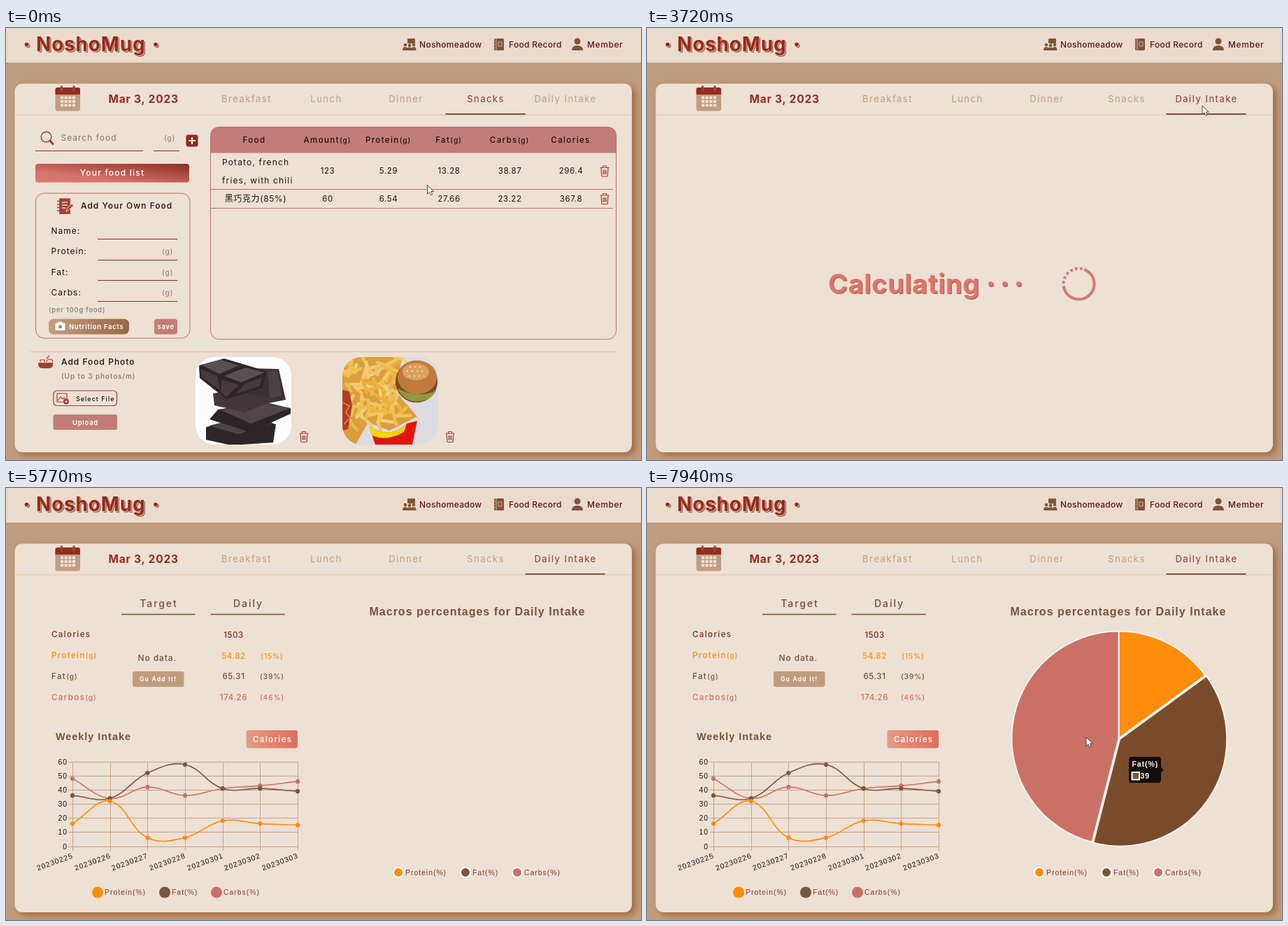
Animation of 908 by 617 pixels, one loop 8 s. Source, as an HTML page:

```html
<!DOCTYPE html>
<html lang="en">
<head>
<meta charset="utf-8">
<title>Food record</title>
<style>
  html, body { margin: 0; width: 100%; height: 100%; overflow: hidden; background: #c09c7f; }
  svg { display: block; width: 100%; height: 100%; }
  text { font: 12px Inter, "Noto Sans CJK TC", "Noto Sans CJK SC", sans-serif; letter-spacing: 1px; fill: #1a1212; }
  .mid { text-anchor: middle; }
  .end { text-anchor: end; }
  .med { font-weight: 500; }
  .nav { font-weight: 500; letter-spacing: .3px; fill: #5c1410; }
  .tab { font-size: 13px; letter-spacing: 1.5px; text-anchor: middle; }
  .head { font-size: 11.5px; font-weight: 500; letter-spacing: 1.4px; }
  .num { font-size: 11.5px; letter-spacing: .6px; text-anchor: middle; }
  .unit, .head tspan { font-size: 10px; letter-spacing: 1px; }
  .gray { fill: #85766c; }
  .btn { font-size: 9.4px; font-weight: 600; letter-spacing: .8px; fill: #fff; }
  .col { font-size: 14px; font-weight: 500; letter-spacing: 1.9px; fill: #7a4f36; text-anchor: middle; }
  .chart { font: 10.4px "Liberation Sans", Arial, sans-serif; }
  .title { font: bold 16px "Liberation Sans", Arial, sans-serif; fill: #7a5238; }
  .tip { font: bold 10.4px "Liberation Sans", Arial, sans-serif; fill: #fff; }
  .key { fill: #853a2e; }
  .line { stroke: #8f2a20; fill: none; }
  .rose { stroke: #bb6e68; fill: none; }
  .icon { stroke: #a63f35; fill: none; stroke-width: 1.2; }
</style>
</head>
<body>
<svg viewBox="0 0 908 617" xmlns="http://www.w3.org/2000/svg">
  <defs>
    <linearGradient id="list" y1="1" y2="0"><stop stop-color="#d97a6f"/><stop offset=".3" stop-color="#d2746a"/><stop offset="1" stop-color="#8f2b22"/></linearGradient>
    <linearGradient id="facts"><stop stop-color="#c39f82"/><stop offset="1" stop-color="#9c6644"/></linearGradient>
    <linearGradient id="kcal"><stop stop-color="#e29c8a"/><stop offset=".5" stop-color="#e5826c"/><stop offset="1" stop-color="#dd6e62"/></linearGradient>
    <clipPath id="choc"><rect x="271" y="470" width="137" height="125" rx="27"/></clipPath>
    <clipPath id="fry"><rect x="481" y="470" width="136.500" height="125" rx="27"/></clipPath>
    <clipPath id="area"><rect x="91" y="388" width="330" height="127"/></clipPath>
    <g id="bin" class="icon"><path d="M0 3h13M4 3V.5h5V3M1.500 3l.8 11.500q.1 1 1 1h6.400q.9 0 1-1L11.500 3M4.500 6v6.500M6.500 6v6.500M8.500 6v6.500"/></g>
  </defs>

  <rect width="908" height="617" fill="#c09c7f"/>
  <rect width="908" height="49.500" fill="#ebdbcd" style="filter:drop-shadow(0 0 1px #a57e60)"/>
  <rect x="12.500" y="79.500" width="882.500" height="526.500" rx="11" fill="#ede0d4" style="filter:drop-shadow(5px 4px 5px #a0693f)"/>
  <path d="M12.500 124H895" stroke="#e2c5b0"/>

  <!-- header -->
  <g style="filter:drop-shadow(1px 1px 0 #dcb892) drop-shadow(1.500px 1.500px 0 #8a6148)">
    <text x="43" y="33" style="font-size:28px;font-weight:700;letter-spacing:.8px;fill:#952b20">NoshoMug</text>
    <circle cx="29.500" cy="23.500" r="2.800" fill="#952b20"/><circle cx="214" cy="23.500" r="2.800" fill="#952b20"/>
  </g>
  <g fill="#7f5539">
    <path d="M575 15h9q1 0 1 1v5q0 1-1 1h-5l-2 2v-2h-2q-1 0-1-1v-5q0-1 1-1z"/>
    <circle cx="571" cy="24" r="2.300"/><circle cx="577" cy="25" r="2.300"/><circle cx="583" cy="24" r="2.300"/>
    <path d="M567 32q0-5 4-5 2 0 3 1.500 3-2 6 0 1-1.500 3-1.500 3.500 0 3.500 5z"/>
    <rect x="698" y="15" width="14" height="17" rx="1.500"/>
    <circle cx="817" cy="19" r="4.500"/><path d="M809 32q0-7 8-7t8 7z"/>
  </g>
  <path d="M701 15v17M696.500 19h3M696.500 23.500h3M696.500 28h3M704 20h5v6h-5z" stroke="#cdb29c" fill="none"/>
  <text x="591" y="27.500" class="nav">Noshomeadow</text>
  <text x="719" y="27.500" class="nav">Food Record</text>
  <text x="831" y="27.500" class="nav" style="letter-spacing:.6px">Member</text>

  <!-- calendar and tabs -->
  <rect x="70.500" y="85" width="35.500" height="33.500" rx="3" fill="#c09c7f"/>
  <path d="M70.500 95v-7q0-3 3-3h29.500q3 0 3 3v7z" fill="#952b20"/>
  <path d="M79.500 84v5M97 84v5" stroke="#7f5539" stroke-width="3.500" stroke-linecap="round"/>
  <path d="M78 99.500h21M78 105h21M78 110.500h21" stroke="#ede0d4" stroke-width="4" stroke-dasharray="4.200 1.400"/>
  <text x="146.500" y="107" style="font-size:15.500px;font-weight:700;letter-spacing:.8px;fill:#952b20">Mar 3, 2023</text>
  <g id="tabs"></g>
  <path id="mark" d="M0 122.800h114" stroke="#6f3b2c" stroke-width="1.700"/>

  <!-- snack list -->
  <g id="snacks">
    <circle cx="57.500" cy="155.500" r="7.300" fill="none" stroke="#7a4a3a" stroke-width="1.400"/>
    <path d="M63 161l4 4.500" stroke="#a5382c" stroke-width="3" stroke-linecap="round"/>
    <text x="78.500" y="161" class="gray">Search food</text>
    <text x="226" y="161" class="gray unit">(g)</text>
    <path class="line" d="M42 175.500H196M211 175.500H248M131 301.500H245M131 331.500H245M131 360.500H245M131 390.500H245"/>
    <rect x="257.500" y="152.500" width="17" height="17" rx="3" fill="#952b20"/>
    <path d="M261 161h10M266 156v10" stroke="#fff" stroke-width="2"/>
    <rect x="42" y="194" width="220" height="26.500" rx="4" fill="url(#list)"/>
    <text x="152" y="211" class="mid med" style="fill:#fff;letter-spacing:1.200px">Your food list</text>

    <rect x="42.500" y="236" width="220.500" height="207" rx="12" class="rose"/>
    <path d="M77 244h14v21H77zM73 247.500h5M73 252h5M73 256.500h5M73 261h5" fill="#a63f35" stroke="#a63f35" stroke-width="1.600"/>
    <path d="M80 249h8M80 253h8M80 257h5" stroke="#ede0d4" stroke-width="1.300"/>
    <path d="M86 262l1-4 7-7 2.500 2.500-7 7z" fill="#a63f35" stroke="#ede0d4"/>
    <text x="107" y="258" class="med">Add Your Own Food</text>
    <g id="form"></g>
    <text x="61" y="406" class="gray med" style="font-size:9.200px;letter-spacing:.9px">(per 100g food)</text>
    <rect x="61" y="415.500" width="115" height="22" rx="7" fill="url(#facts)"/>
    <path d="M71 422h3l1.500-2h4l1.500 2h3v9.500H71z" fill="#fff" stroke="#fff" stroke-linejoin="round"/>
    <circle cx="77.500" cy="426.500" r="2.600" fill="#b38a6b"/>
    <text x="90" y="430" class="btn">Nutrition Facts</text>
    <rect x="212" y="415.500" width="33" height="22" rx="4" fill="#c27d78"/>
    <text x="216.500" y="430" class="btn">save</text>

    <path d="M292.500 178.500V154q0-12.500 12.500-12.500h555q12.500 0 12.500 12.500v24.500z" fill="#c27d78"/>
    <rect x="292.500" y="141.500" width="580" height="303" rx="12" class="rose"/>
    <path class="rose" d="M292 230.500H868M292 257.500H868"/>
    <text x="309" y="195.500" style="letter-spacing:1.150px">Potato, french</text>
    <text x="309" y="221.500" style="letter-spacing:1.150px">fries, with chili</text>
    <text x="357" y="248" class="mid" style="letter-spacing:.6px">黑巧克力(85%)</text>
    <g id="table"></g>
    <use href="#bin" x="849.500" y="196.500"/><use href="#bin" x="849.500" y="236"/>

    <path d="M35 462.500H873" stroke="#dcbba6"/>
    <path d="M46 478h21.500q0 8-6 8H52q-6 0-6-8z" fill="#a63f35"/>
    <path d="M49 477v-3h6v3M58 477q0-4 4.500-4t4 4M58 472l4-4" class="icon" stroke-width="2"/>
    <text x="79" y="481" class="med">Add Food Photo</text>
    <text x="79" y="501" class="gray med" style="font-size:10px;letter-spacing:.9px">(Up to 3 photos/m)</text>
    <rect x="68" y="518" width="90.500" height="21.500" rx="5" class="icon"/>
    <path class="icon" d="M73 522h14v12H73zM74 532l4-5 3 3 2-2 3 4"/>
    <circle cx="86" cy="533.500" r="4" fill="#a63f35"/><path d="M84 533.500h4M86 531.500v4" stroke="#ede0d4"/>
    <text x="100" y="532.500" class="med" style="font-size:9px">Select File</text>
    <rect x="67.500" y="552" width="91.500" height="22" rx="3" fill="#c27d78"/>
    <text x="113.500" y="566.500" class="btn mid">Upload</text>

    <g clip-path="url(#choc)">
      <rect x="271" y="470" width="137" height="125" fill="#fdfdfd"/>
      <path d="M286 570l60-16 40 12-4 26-60 4-36-8z" fill="#2c2628"/>
      <path d="M290 568l56-14 36 10-50 16z" fill="#4b4346"/>
      <path d="M303 545l60-10 44 8v8l-58 26-58-18z" fill="#2b2527"/>
      <path d="M306 545l60-12 40 10-56 22z" fill="#504649"/>
      <path d="M345 486l45 1 10 44-46 9-52-14z" fill="#393133"/>
      <path d="M374 490l14-1 7 36-18 4z" fill="#4a4144"/>
      <path d="M296 522l26-5 64 14-44 18-44-10z" fill="#413739"/>
      <path d="M276 482l36-10 60 18-5 24-52 16-38-30z" fill="#2d2729"/>
      <path d="M279 481l28-7 26 8-28 12zM312 497l30-12 28 7-34 14z" fill="#5a5053"/>
      <path d="M278 487l24 10 4 20-26-18zM309 502l24 8-18 17-8-8zM340 509l26-10-3 12-34 12z" fill="#453b3e"/>
    </g>
    <g clip-path="url(#fry)">
      <rect x="481" y="470" width="137" height="125" fill="#dcdce2"/>
      <path d="M481 470h85l-8 50 30 35-40 20-30-12-18 32h-19z" fill="#dc9e3c"/>
      <g id="fries" stroke-width="4.500" stroke-linecap="round"></g>
      <path d="M481 517l10 2 4 20-6 34-8 2z" fill="#b23c20"/>
      <path d="M482 535l9 5-5 9 6 8-9 9" stroke="#e07a4a" stroke-width="2" fill="none"/>
      <circle cx="587" cy="505" r="30" fill="#7b4a22"/>
      <path d="M560 515q10 20 30 18 18-1 25-15-26 12-55-3z" fill="#8f9a3a"/>
      <ellipse cx="588" cy="499" rx="28" ry="24" fill="#c27a3c"/>
      <ellipse cx="586" cy="491" rx="19" ry="12" fill="#dba15f"/>
      <path d="M573 490h27M577 484h20M576 497h22" stroke="#f6dfb0" stroke-width="2" stroke-dasharray="2 5"/>
      <path d="M519 569q30 19 54-4l15-4-7 34h-53z" fill="#e0170f"/>
      <path d="M519 569q30 19 54-4l-4 12q-24 14-46 5z" fill="#f8d400"/>
    </g>
    <use href="#bin" x="419.500" y="576"/><use href="#bin" x="628.500" y="576"/>
  </g>

  <!-- loading -->
  <g id="loading">
    <g fill="#dc766b" style="filter:drop-shadow(1.500px 1.500px 0 #a9574d)">
      <text x="259" y="379" style="font-size:38px;font-weight:700;letter-spacing:.55px;fill:#dc766b">Calculating</text>
      <circle cx="491.500" cy="365.500" r="3.500"/><circle cx="511.500" cy="365.500" r="3.500"/><circle cx="531.500" cy="365.500" r="3.500"/>
    </g>
    <circle id="ring" cx="617.500" cy="365.500" r="22" fill="none" stroke="#d4796e" stroke-width="4"
      stroke-dasharray="92.300 3.300 3.800 3.300 3.800 3.300 3.800 3.300 3.800 3.300 3.800 3.300 3.800 3.300"/>
  </g>

  <!-- daily intake -->
  <g id="daily">
    <text x="218.500" y="170" class="col">Target</text><text x="346.500" y="170" class="col">Daily</text>
    <path d="M165 180.500H270.500M292.500 180.500H398.500" stroke="#7a4f36" stroke-width="1.500"/>
    <g id="labels"></g>
    <g id="values">
      <text x="188.500" y="247" class="med" style="fill:#7a4f36;letter-spacing:.9px">No data.</text>
      <rect x="181" y="262" width="73.500" height="22" rx="3" fill="#c09c7f"/>
      <text x="191" y="276" class="btn" style="font-size:8.500px;letter-spacing:1.250px">Go Add It!</text>
    </g>
    <text x="71" y="360" class="title" style="font-size:14.400px">Weekly Intake</text>
    <rect x="343.500" y="346" width="73.500" height="25.500" rx="3" fill="url(#kcal)"/>
    <text x="353" y="363" class="head" style="fill:#fff">Calories</text>
    <g id="grid"></g>
    <g id="lines" clip-path="url(#area)"></g>
    <text x="519.500" y="181.500" class="title">Macros percentages for Daily Intake</text>
    <g id="pie" stroke="#f7f2ee" stroke-width="2" stroke-linejoin="round"></g>
    <g id="legend"></g>
    <g id="tip"></g>
  </g>

  <path id="cursor" d="M0 0V12.500L3 9.800 5 14.200 7.200 13.200 5.200 9H9.200Z" fill="#fff" stroke="#3a3440" stroke-width=".9"/>
</svg>
<script>
const $ = id => document.getElementById(id);
const text = (x, y, s, cls = '', fill = '') =>
  `<text x="${x}" y="${y}" class="${cls}"${fill && ` style="fill:${fill}"`}>${s}</text>`;
const unit = s => s.replace('(g)', '<tspan>(g)</tspan>');
const show = (id, on) => $(id).style.display = on ? '' : 'none';
const clamp = v => Math.max(0, Math.min(1, v));
const lerp = (a, b, k) => a + (b - a) * k;
const outQuart = p => 1 - (1 - clamp(p)) ** 4;
const mix = (a, b, k) => `rgb(${a.map((v, i) => lerp(v, b[i], k))})`;

const LOOP = 8000, LOAD = 2120, REPORT = 4794, VALUES = 5000, PIE = 6110, HOVER = 6600, SWITCH = 7200;
const TAN = [193, 157, 128], RED = [139, 55, 43];
const ORANGE = '#ff8c0a', BROWN = '#7a563d', PINK = '#cb7065';

// Static repeats
$('tabs').innerHTML = ['Breakfast', 'Lunch', 'Dinner', 'Snacks', 'Daily Intake']
  .map((s, i) => text(344 + i * 114, 106, s, 'tab')).join('');
const tabs = $('tabs').children;

$('form').innerHTML = ['Name:', 'Protein:', 'Fat:', 'Carbs:'].map((s, i) =>
  text(64.5, 294 + i * 29.4, s) + (i ? text(223, 294 + i * 29.4, '(g)', 'gray unit') : '')).join('');

const cols = [355, 459.5, 546.5, 633, 720, 807.5];
$('table').innerHTML =
  ['Food', 'Amount(g)', 'Protein(g)', 'Fat(g)', 'Carbs(g)', 'Calories']
    .map((s, i) => text(cols[i], 164, unit(s), 'head mid')).join('') +
  [['123', '5.29', '13.28', '38.87', '296.4'], ['60', '6.54', '27.66', '23.22', '367.8']]
    .map((row, r) => row.map((s, i) => text(cols[i + 1] + .5, 208 + r * 40, s, 'num')).join('')).join('');

let seed = 7;
const rnd = () => (seed = seed * 16807 % 2147483647) / 2147483647;
$('fries').innerHTML = Array.from({ length: 95 }, () => {
  const x = 480 + rnd() * 85, y = 468 + rnd() * 100, a = rnd() * 6.3, n = 10 + rnd() * 14;
  return `<path d="M${x} ${y}l${n * Math.cos(a)} ${n * Math.sin(a)}" stroke="hsl(${38 + rnd() * 6} 82% ${57 + rnd() * 17}%)"/>`;
}).join('');

const tints = ['#7f2a22', ORANGE, '#7a4f36', PINK];
$('labels').innerHTML = ['Calories', 'Protein(g)', 'Fat(g)', 'Carbos(g)']
  .map((s, i) => text(65, 212.5 + i * 30, unit(s), 'head', tints[i])).join('');
$('values').innerHTML += ['1503', '54.82', '65.31', '174.26']
  .map((s, i) => text(325.5, 214 + i * 29.6, s, 'num med', tints[i])).join('') +
  ['(15%)', '(39%)', '(46%)'].map((s, i) => text(380.5, 243.5 + i * 29.5, s, 'mid med unit', tints[i + 1])).join('');

// Line chart
const DX = 53.67, px = i => 95 + i * DX, py = v => 511.5 - v * 2.008;
let grid = '', ticks = '';
for (let i = 0; i < 7; i++) {
  const y = Math.round(py(i * 10)) + .5, x = Math.round(px(i)) + .5;
  grid += `M89 ${y}H417M${x} 391V518`;
  ticks += text(88, y + 3.5, i * 10, 'chart end') +
    `<text class="chart end" transform="translate(${x + 1} 528) rotate(-20)">${[20230225, 20230226, 20230227, 20230228, 20230301, 20230302, 20230303][i]}</text>`;
}
$('grid').innerHTML = `<path d="${grid}" stroke="#c4a388" fill="none"/>` + ticks;

const names = ['Protein(%)', 'Fat(%)', 'Carbs(%)'], hues = [ORANGE, BROWN, PINK];
$('legend').innerHTML = names.map((s, i) => {
  const x = [131, 227, 301][i];
  return `<circle cx="${x}" cy="577.500" r="8" fill="${hues[i]}"/>` + text(x + 10, 581, s, 'chart key') +
    `<circle cx="${x + 430}" cy="549" r="7" fill="${hues[i]}" stroke="#fff" stroke-width="2"/>` +
    text(x + 440, 552.5, s, 'chart key');
}).join('');

const series = [[16, 32, 6, 6, 18, 16, 15], [36, 34, 52, 58, 41, 41, 39], [48, 34, 42, 36, 41, 43, 46]];

function spline(p) {
  const gap = (a, b) => Math.hypot(b[0] - a[0], b[1] - a[1]);
  const ctrl = p.map((c, i) => {
    const a = p[i - 1] || c, b = p[i + 1] || c, d = gap(a, c), e = gap(c, b), k = .4 / (d + e || 1);
    const at = m => [c[0] + m * (b[0] - a[0]), c[1] + m * (b[1] - a[1])];
    return [at(-k * d), at(k * e)];
  });
  return 'M' + p[0] + p.slice(1).map((c, i) => `C${ctrl[i][1]} ${ctrl[i + 1][0]} ${c}`).join('');
}

function drawLines(k) {
  $('lines').innerHTML = [2, 1, 0].map(s => {
    const p = series[s].map((v, i) => [lerp(72, px(i), k), lerp(391, py(v), k)]);
    return `<path d="${spline(p)}" fill="none" stroke="${hues[s]}" stroke-width="1.600"/>` +
      p.map(([x, y]) => `<circle cx="${x}" cy="${y}" r="3.100" fill="${hues[s]}"/>`).join('');
  }).join('');
}

// Pie and tooltip
const slices = [
  [0, .15, [255, 140, 10], [240, 129, 6]],
  [.15, .54, [122, 86, 61], [122, 75, 43]],
  [.54, 1, [203, 112, 101], [203, 112, 101]]
];

function drawPie(hover) {
  $('pie').innerHTML = slices.map(([a, b, base, lit], i) => {
    const dir = f => [Math.sin(f * 2 * Math.PI), -Math.cos(f * 2 * Math.PI)];
    const m = dir((a + b) / 2), cx = 674.5 + m[0] * 2 * hover[i], cy = 357.5 + m[1] * 2 * hover[i];
    const rim = f => dir(f).map((v, j) => [cx, cy][j] + 153 * v);
    return `<path d="M${cx} ${cy}L${rim(a)}A153 153 0 0 1 ${rim(b)}Z" fill="${mix(base, lit, hover[i])}"/>`;
  }).join('');
}

function drawTip(t) {
  const k = outQuart((t - SWITCH) / 400), i = t < SWITCH ? 0 : 1, w = lerp(70, 46, k), x = -w - 4;
  $('tip').setAttribute('transform', `translate(${lerp(708, 739, k)} ${lerp(289, 402.5, k)})`);
  $('tip').setAttribute('opacity', clamp((t - HOVER) / 200));
  $('tip').innerHTML = `<path d="M${x + 4} -18.500H-8q4 0 4 4V-4L0 0-4 4V14.500q0 4-4 4H${x + 4}q-4 0-4-4V-14.500q0-4 4-4z" fill="#000" fill-opacity=".82"/>` +
    text(x + 4.5, -5, names[i], 'tip') + text(x + 16.5, 12, [15, 39][i], 'tip') +
    `<rect x="${x + 4.5}" y="3.500" width="10.500" height="10.500" fill="${hues[i]}" stroke="#fff" stroke-width="2"/>`;
}

// Pointer: [time, x, y]
const moves = [
  [0, 602.5, 224.5], [70, 602.5, 224.5], [540, 794, 111], [3890, 794, 111], [4270, 866, 170],
  [6520, 842, 240], [6680, 775, 258.5], [7000, 735, 290], [7200, 735, 320], [7600, 700, 385], [7940, 628, 356], [LOOP, 628, 356]
];

function drawCursor(t) {
  const n = moves.findIndex(m => m[0] > t), [a, x, y] = moves[n - 1], [b, u, v] = moves[n];
  const k = (t - a) / (b - a);
  $('cursor').setAttribute('transform', `translate(${lerp(x, u, k)} ${lerp(y, v, k)})`);
  show('cursor', t < 4270 || t >= 6520);
}

function draw(t) {
  const first = t < LOAD, report = t >= REPORT;
  show('snacks', first);
  show('loading', !first && !report);
  show('daily', report);
  [...tabs].forEach((tab, i) => {
    const on = first ? (i === 3 ? 1 : i === 4 ? clamp((t - 400) / 140) : 0) : +(i === 4);
    tab.style.fill = mix(TAN, RED, on);
  });
  $('mark').setAttribute('transform', `translate(${first ? 628.5 : 742.5} 0)`);
  $('ring').setAttribute('transform', `rotate(${-45 + (t - LOAD) * 360 / 1720} 617.5 365.5)`);
  if (report) {
    show('values', t >= VALUES);
    show('pie', t >= PIE);
    show('tip', t >= HOVER);
    drawLines(outQuart((t - REPORT) / 1000));
    const swap = outQuart((t - SWITCH) / 400);
    drawPie([outQuart((t - HOVER) / 400) - swap, swap, 0]);
    drawTip(t);
  }
  drawCursor(t);
}

const start = performance.now();
function tick() {
  draw((performance.now() - start) % LOOP);
  requestAnimationFrame(tick);
}
tick();
</script>
</body>
</html>
```
